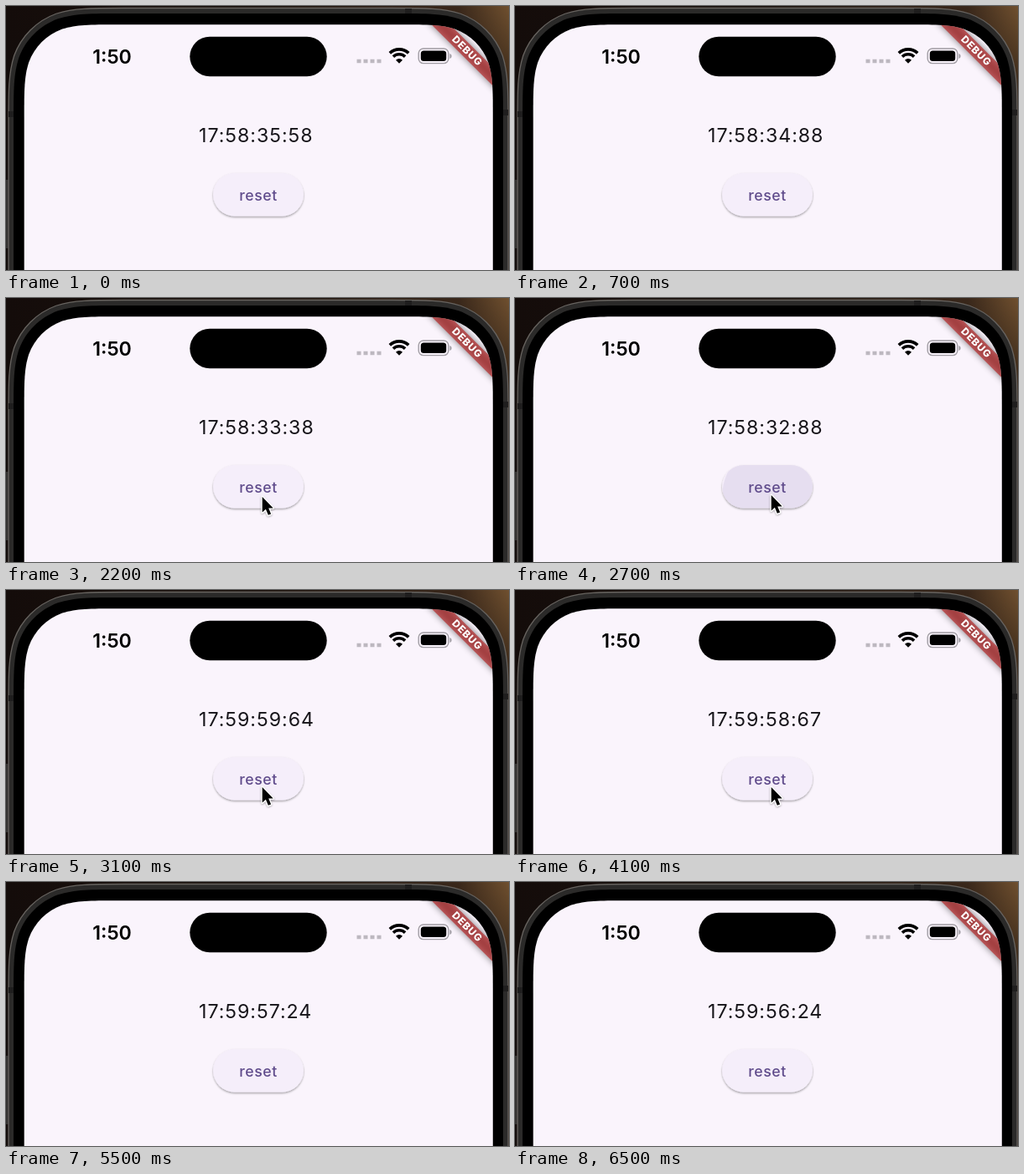
These frames come from a looping animation (600x316 px, 6.6 s). An HTML page:

```html
<!DOCTYPE html>
<html lang="en">
<head>
<meta charset="utf-8">
<title>Countdown with reset</title>
<style>
  html, body { margin: 0; width: 100%; height: 100%; overflow: hidden; background: #140d0b; }
  svg { display: block; width: 600px; height: 316px; }
  text { font-family: Inter, Roboto, "Liberation Sans", sans-serif; }
  .clock { font-size: 23.2px; font-weight: 600; }
  .timer { font-size: 23.2px; letter-spacing: .95px; fill: #17151a; }
  .label { font-size: 17.7px; font-weight: 500; letter-spacing: .55px; fill: #5f4b8b; }
  .banner { font-size: 12px; font-weight: 800; letter-spacing: .7px; fill: #fff; }
</style>
</head>
<body>
<svg viewBox="0 0 600 316" xmlns="http://www.w3.org/2000/svg">
  <defs>
    <linearGradient id="desk">
      <stop offset="0" stop-color="#140c0a"/>
      <stop offset=".5" stop-color="#1c130e"/>
      <stop offset=".9" stop-color="#3a281b"/>
      <stop offset="1" stop-color="#70502f"/>
    </linearGradient>
    <linearGradient id="dusk" x2="0" y2="1">
      <stop offset="0" stop-color="#120c0a" stop-opacity="0"/>
      <stop offset=".4" stop-color="#120c0a" stop-opacity=".75"/>
    </linearGradient>
    <clipPath id="screen"><path id="glass"/></clipPath>
    <clipPath id="pill"><rect x="247" y="200" width="108" height="51.5" rx="25.75"/></clipPath>
    <filter id="soft" x="-20%" y="-150%" width="140%" height="400%"><feGaussianBlur stdDeviation="4"/></filter>
    <filter id="lift" x="-10%" y="-20%" width="120%" height="150%">
      <feDropShadow dx="0" dy="1.4" stdDeviation="1.1" flood-color="#000" flood-opacity=".36"/>
    </filter>
    <filter id="drop" x="-50%" y="-50%" width="200%" height="200%">
      <feDropShadow dx="0" dy="1" stdDeviation="1" flood-color="#000" flood-opacity=".35"/>
    </filter>
  </defs>

  <!-- desktop and phone body -->
  <rect width="600" height="316" fill="url(#desk)"/>
  <rect width="600" height="316" fill="url(#dusk)"/>
  <path d="M0 208h4v82h-4z" fill="#343230"/>
  <path id="frame" fill="#2b2a29" stroke="#67635f" stroke-width="1.3"/>
  <path d="M3 126h6v7h-6zM593 124h6v7h-6zM476 3h8v6h-8z" fill="#1f1e1e"/>
  <path id="bezel"/>

  <g clip-path="url(#screen)">
    <rect x="21" y="22" width="561" height="300" fill="#faf4fc"/>
    <g transform="translate(581 22) rotate(45)">
      <rect x="-60" y="36.5" width="120" height="15.6" fill="#000" opacity=".5" filter="url(#soft)"/>
      <rect x="-60" y="36.5" width="120" height="15.6" fill="#b71c1c" opacity=".63"/>
      <text class="banner" x=".6" y="48.3" text-anchor="middle">DEBUG</text>
    </g>
  </g>

  <!-- status bar -->
  <text class="clock" x="103.2" y="68.5">1:50</text>
  <rect x="219.3" y="36.8" width="163.4" height="47.4" rx="23.7"/>
  <path d="M418.5 66h29" stroke="#bdb8c0" stroke-width="4.4" stroke-dasharray="5 3"/>
  <g transform="translate(0 -.4)">
    <g fill="none" stroke="#000" stroke-width="3.6">
      <path d="M457.8 56.8a16.2 16.2 0 0 1 22.4 0"/>
      <path d="M461.9 61a10.2 10.2 0 0 1 14.2 0"/>
    </g>
    <path d="M469 69.2l-4-4.1a5.8 5.8 0 0 1 8 0z"/>
  </g>
  <rect x="492.2" y="51" width="35.6" height="17.6" rx="5.6" fill="none" stroke="#a09ca3" stroke-width="1.4"/>
  <rect x="494.8" y="53.5" width="30.4" height="12.6" rx="3.6"/>
  <path d="M529.4 57v6q2.2-.7 2.2-3t-2.2-3z" fill="#a09ca3"/>

  <text class="timer" id="timer" x="230" y="162.6"></text>

  <rect x="247" y="200" width="108" height="51.5" rx="25.75" fill="#f5eefa" filter="url(#lift)"/>
  <circle id="ripple" cx="305" cy="235" fill="#65558f" clip-path="url(#pill)"/>
  <text class="label" x="278.3" y="233">reset</text>

  <path id="cursor" d="M0 0V18.6L4.2 14.8L7.1 21.8L10.4 20.4L7.5 13.5H13Z"
        stroke="#fff" stroke-width="2.6" stroke-linejoin="round" paint-order="stroke" filter="url(#drop)"/>
</svg>
<script>
  const LOOP = 6600, STEP = 100, RESET = 2740;
  const HOUR_MIN = 17 * 60;

  // [ms, centiseconds left past 17:00:00]
  const before = [[0, 351558], [1500, 351407], [2200, 351338], [2700, 351288]];
  const after = [[2800, 359994], [3100, 359964], [4100, 359867], [5500, 359724], [6500, 359624]];

  // [ms, x, y] of the pointer tip
  const pointer = [[1700, 334, 318], [1900, 318, 272], [2100, 306, 241], [2200, 305.7, 238],
                   [2400, 305.7, 236], [4600, 305.7, 236], [4900, 352, 230], [5000, 420, 226]];
  // [ms, radius, opacity]
  const ripples = [[2500, 8, 0], [2600, 30, .1], [2800, 85, .1], [3000, 110, 0]];

  const $ = id => document.getElementById(id);
  const pad = n => String(n).padStart(2, '0');

  // Top of a panel with continuous-curvature corners, open past the stage bottom.
  function panel(left, top, right, r) {
    const L = (a, b) => `${left + a * r} ${top + b * r} `;
    const R = (a, b) => `${right - a * r} ${top + b * r} `;
    return `M${left} 400L` + L(0, 1.529) +
      'C' + L(0, 1.088) + L(0, .868) + L(.075, .631) +
      'C' + L(.169, .373) + L(.373, .169) + L(.631, .075) +
      'C' + L(.868, 0) + L(1.088, 0) + L(1.529, 0) +
      'L' + R(1.529, 0) +
      'C' + R(1.088, 0) + R(.868, 0) + R(.631, .075) +
      'C' + R(.373, .169) + R(.169, .373) + R(.075, .631) +
      'C' + R(0, .868) + R(0, 1.088) + R(0, 1.529) +
      `L${right} 400Z`;
  }
  $('frame').setAttribute('d', panel(3, 2.5, 599, 90));
  $('bezel').setAttribute('d', panel(9, 9, 593, 84));
  $('glass').setAttribute('d', panel(21.7, 22.2, 580.8, 72));

  function sample(keys, t) {
    const i = keys.findIndex(k => k[0] >= t);
    if (i < 0) return keys[keys.length - 1].slice(1);
    if (i === 0) return keys[0].slice(1);
    const a = keys[i - 1], b = keys[i];
    const p = (t - a[0]) / (b[0] - a[0]);
    return a.slice(1).map((v, j) => v + (b[j + 1] - v) * p);
  }

  function format(cs) {
    const sec = Math.floor(cs / 100), min = HOUR_MIN + Math.floor(sec / 60);
    return [Math.floor(min / 60), min % 60, sec % 60, cs % 100].map(pad).join(':');
  }

  function draw(t) {
    const [cs] = sample(t < RESET ? before : after, t);
    $('timer').textContent = format(Math.round(cs));

    const [x, y] = sample(pointer, t);
    $('cursor').setAttribute('transform', `translate(${x} ${y})`);
    $('cursor').style.display = t > 1700 && t <= 5000 ? '' : 'none';

    const [r, opacity] = sample(ripples, t);
    $('ripple').setAttribute('r', r);
    $('ripple').setAttribute('opacity', opacity);
  }

  const start = performance.now();
  function tick() {
    const t = (performance.now() - start) % LOOP;
    draw(Math.floor(t / STEP) * STEP);
    requestAnimationFrame(tick);
  }
  tick();
</script>
</body>
</html>
```
